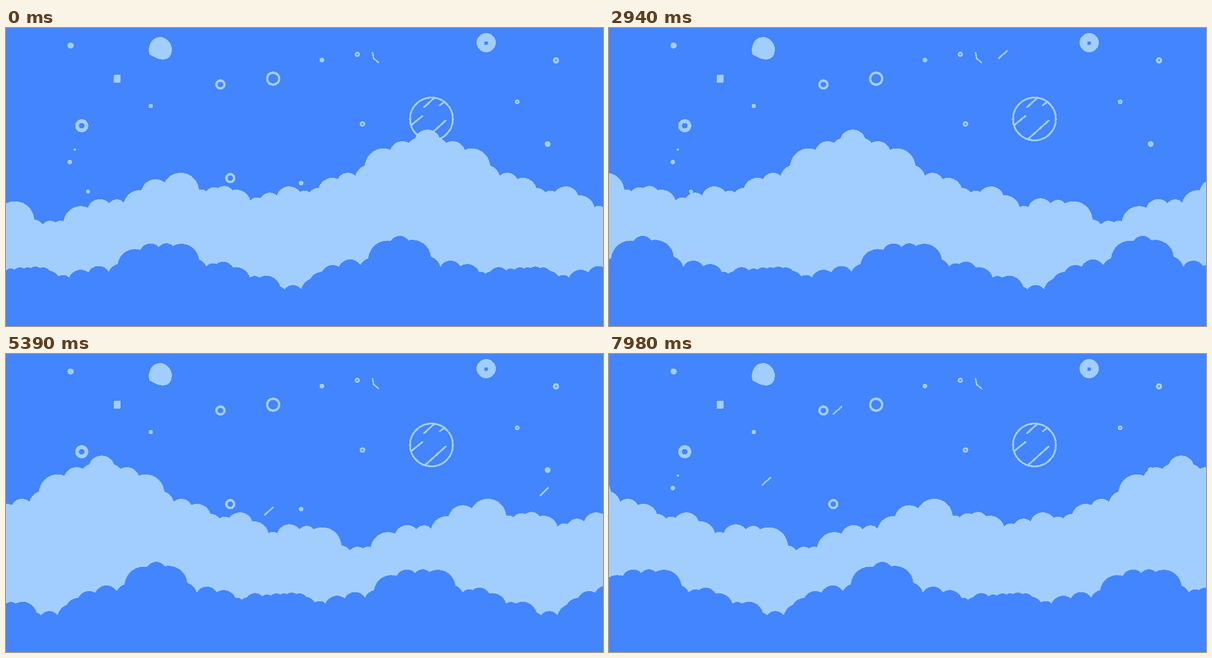
Recreate the animation shown at these times as an HTML page. Size 1058x529 px, loop 8 s.

```html
<!DOCTYPE html>
<html lang="en">
<head>
<meta charset="utf-8">
<title>Drifting clouds</title>
<style>
  :root { --sky: #4384ff; --pale: #a2ceff; }
  html, body { margin: 0; width: 100%; height: 100%; overflow: hidden; background: var(--sky); }
  svg { display: block; width: 100%; height: 100%; shape-rendering: crispEdges; }
  .dots { fill: var(--pale); }
  .lines { fill: none; stroke: var(--pale); stroke-width: 3.2; }
  #back { fill: var(--pale); }
  #front { fill: var(--sky); }

  /* 114 steps of 70 ms, then a short hold before the loop restarts */
  .drift { animation: drift 8s infinite; }
  @keyframes drift {
    from { transform: none; animation-timing-function: steps(114); }
    99.75%, to { transform: translate(var(--dx), var(--dy, 0px)); }
  }
  #back { --dx: -855px; }
  #front { --dx: 672.5px; }
  #meteors { --dx: -757px; --dy: 755px; }
</style>
</head>
<body>
<svg viewBox="0 0 1058 529">
  <g class="dots">
    <circle cx="114.5" cy="31" r="5.5"/>
    <path d="M253 38C254 24 263 16 273 16S294 26 294 38S288 56 278 56S262 50 254 47Z"/>
    <rect x="191" y="83" width="12" height="14" rx="2"/>
    <circle cx="256.5" cy="138.5" r="3.8"/>
    <circle cx="122" cy="215.7" r="2"/>
    <ellipse cx="113" cy="238" rx="3.7" ry="4.3"/>
    <circle cx="145.3" cy="290.3" r="3.4"/>
    <circle cx="523" cy="275.3" r="4"/>
    <circle cx="559.8" cy="57" r="4"/>
    <path fill-rule="evenodd" d="M834 26a17 17 0 0 1 34 0a17 17 0 0 1-34 0ZM848 24h6v4l-2 2h-4Z"/>
    <circle cx="960" cy="206" r="5.2"/>
  </g>
  <g class="lines">
    <circle cx="380" cy="100.3" r="7" stroke-width="4.4"/>
    <circle cx="473.5" cy="90" r="10.6" stroke-width="4"/>
    <circle cx="134.3" cy="173.5" r="8.3" stroke-width="6.6"/>
    <circle cx="397.5" cy="266.5" r="7" stroke-width="4.4"/>
    <circle cx="622.5" cy="46.8" r="3"/>
    <circle cx="974.8" cy="57.5" r="3.5" stroke-width="4.2"/>
    <circle cx="905.8" cy="131" r="2.7" stroke-width="2.6"/>
    <circle cx="631.8" cy="170.3" r="3.2" stroke-width="3.4"/>
    <path stroke-width="2.6" d="M649.5 43L651.5 54L661 62"/>
    <circle cx="754" cy="161.5" r="38"/>
    <path d="M740 141.5L759 124M768 138L778 130M718 172.5L739 155.5M743 197L780 163.5"/>
  </g>
  <g id="meteors" class="lines drift"></g>
  <path id="back" class="drift"/>
  <path id="front" class="drift"/>
</svg>
<script>
  const byId = id => document.getElementById(id);
  const points = text => text.trim().split(/\s+/).map(p => p.split(',').map(Number));

  // A puff is an arc between two notches: wide ones swell, sloping ones flatten.
  function puff([x0, y0], [x1, y1]) {
    const chord = Math.hypot(x1 - x0, y1 - y0);
    const slope = Math.abs(y1 - y0) / chord;
    const bulge = chord * chord / (chord + 80) * (1 - 0.7 * slope);
    const r = (chord * chord / 4 + bulge * bulge) / (2 * bulge);
    return `A${r} ${r} 0 0 1 ${x1} ${y1}`;
  }

  // Repeats one ridge of notches three times and closes it below the stage.
  function ridge(id, notches, period) {
    const all = [-1, 0, 1].flatMap(k => notches.map(([x, y]) => [x + k * period, y]));
    const puffs = all.slice(1).map((p, i) => puff(all[i], p)).join('');
    byId(id).setAttribute('d', `M${all[0]}${puffs}V540H${all[0][0]}Z`);
  }

  // The back ridge has a tall mountain, symmetric about its summit.
  const summit = 747;
  const hills = points(`50,340 65,349 88,345 102,343 145,319 183,311 209,310 240,288
    281,274 342,287 355,290 376,284 401,288 433,306 451,302`);
  const rise = points('480,297 521,291 538,292 554,284 588,268 619,262 636,244 681,216 714,204 725,196');
  const fall = rise.map(([x, y]) => [2 * summit - x, y]).reverse();
  const foot = points('1043,318 1058,318 1098,311 1123,311');
  ridge('back', [...hills, ...rise, ...fall, ...foot], 1122);

  ridge('front', points(`15,429 32,427 44,426 60,426 78,431 93,441 112,443 146,434 182,433
    198,419 238,394 271,389 296,387 342,411 355,423 373,419 402,425 432,443 449,443
    486,459 494,464 523,464 540,445 560,433 590,424 628,421 642,409 682,378 713,377
    753,406 770,424 805,423 838,433 850,436 859,432 886,430`), 886);

  // Start centres, all outside the stage.
  const starts = [[977, -231], [1465, -265.5], [1036, -529], [1162, -655]];
  byId('meteors').innerHTML = starts
    .map(([x, y]) => `<path stroke-width="2.8" d="M${x - 8} ${y + 7.5}l16 -15"/>`).join('');
</script>
</body>
</html>
```
